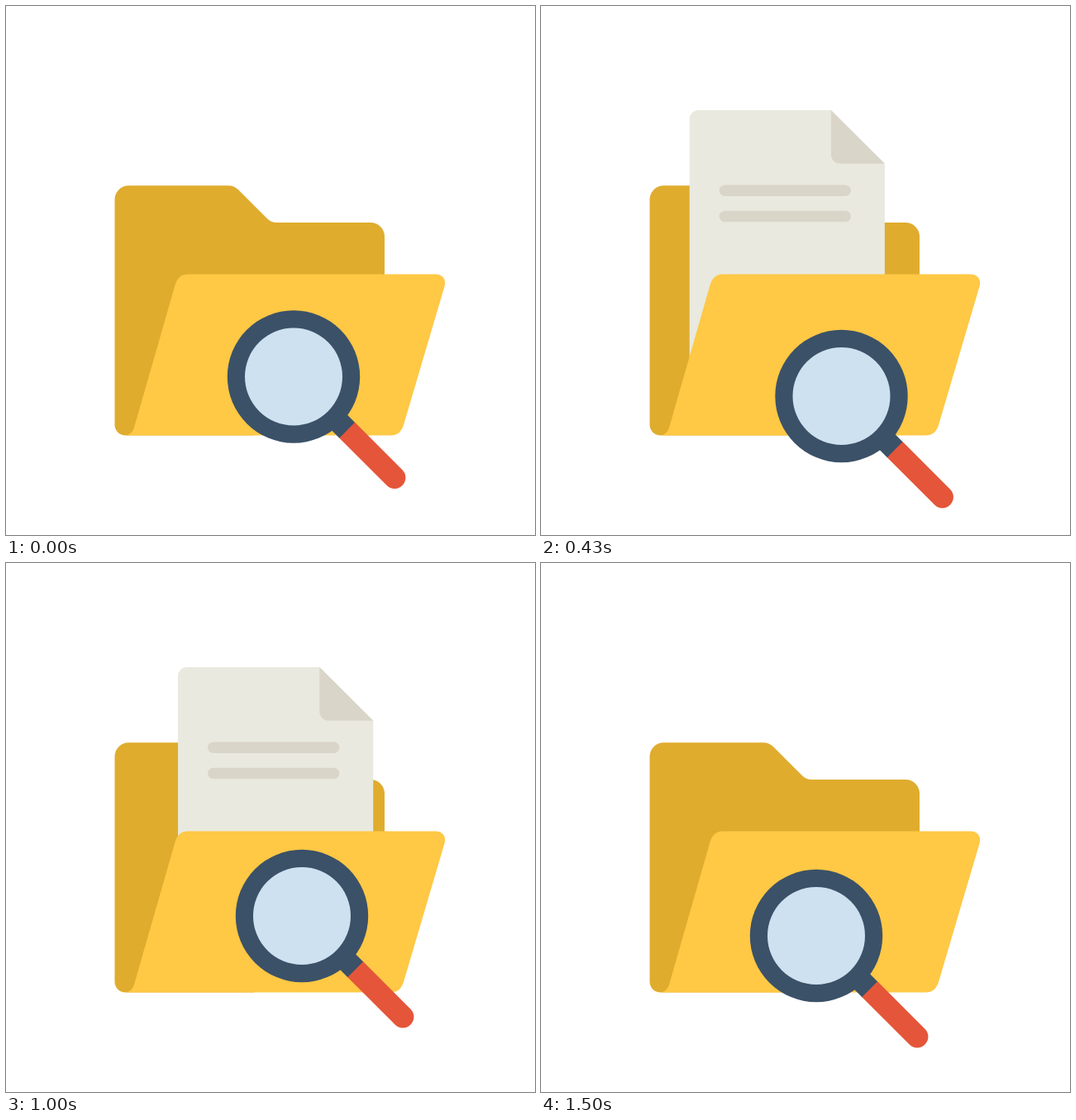
Recreate the animation shown at these times as an HTML page with a canvas. Size 640x640 px, loop 1.64 s.

```html
<!DOCTYPE html>
<html lang="en">
<head>
<meta charset="utf-8">
<title>Folder search</title>
<style>
  html, body { margin: 0; width: 100%; height: 100%; overflow: hidden; background: #fff; }
  canvas { display: block; width: 640px; height: 640px; }
</style>
</head>
<body>
<canvas id="stage" width="640" height="640"></canvas>
<script>
const ctx = document.getElementById('stage').getContext('2d');
const LOOP = 1640, FPS = 14, LAST_STEP = 21;
const BACK = '#dfac2e', FRONT = '#ffc845', PAPER = '#e9e9df', SHADE = '#dad5c9';
const RIM = '#3b5168', LENS = '#cee1f0', HANDLE = '#e55539';

const folderBack = new Path2D(
  'M148.5 217.2H268.5Q276 217.2 281.3 222.4L315.5 256.8Q320.3 262 328 262H441' +
  'A17 17 0 0 1 458 279V400L300 519.5H144.5A13 13 0 0 1 131.5 506.5V234.2A17 17 0 0 1 148.5 217.2Z');
const folderFront = new Path2D(
  'M220 324.5H520C528 324.5 533 331 530.6 339L481 507Q477 519.5 465.5 519.5H143.5' +
  'Q152 519.5 155 510L204.7 337Q208.5 324.5 220 324.5Z');
const sheet = new Path2D(
  'M11 126H171.2L236.2 190.8V433.2A11 11 0 0 1 225.2 444.2H11A11 11 0 0 1 0 433.2V137A11 11 0 0 1 11 126Z');
const fold = new Path2D('M171.2 126L236.2 190.8H182.2A11 11 0 0 1 171.2 179.8Z');

// Centre of the magnifier, one waypoint for every two steps
const waypoints = [
  [348, 448.5], [339, 463], [347, 475.5], [363.5, 472], [377.7, 461.7],
  [376.5, 446], [368, 432.8], [358, 427], [346.6, 425.3]
];
const PULL_START = 16, pull = [-13.6, 25.7];

function fill(path, color) {
  ctx.fillStyle = color;
  ctx.fill(path);
}

function roundBox(x, y, w, h, radii, color) {
  const path = new Path2D();
  path.roundRect(x, y, w, h, radii);
  fill(path, color);
}

function disc(x, y, r, color) {
  const path = new Path2D();
  path.arc(x, y, r, 0, Math.PI * 2);
  fill(path, color);
}

function spline(points, pos) {
  const i = Math.min(Math.floor(pos), points.length - 2);
  const u = pos - i;
  const at = k => points[Math.max(0, Math.min(points.length - 1, k))];
  return [0, 1].map(axis => {
    const [a, b, c, d] = [at(i - 1), at(i), at(i + 1), at(i + 2)].map(p => p[axis]);
    return b + u / 2 * (c - a + u * (2 * a - 5 * b + 4 * c - d + u * (3 * (b - c) + d - a)));
  });
}

function along(point, amount) {
  return point.map((v, axis) => v + pull[axis] * amount);
}

function paperX(step) {
  const entering = Math.max(0, 8 - step), leaving = Math.max(0, step - 12);
  return 190.8 - 1.39 * entering ** 3 + 2.16 * leaving ** 3;
}

function magnifierPose(step) {
  if (step < PULL_START) {
    const rim = spline(waypoints, step / 2);
    return { rim, lens: rim };
  }
  const u = (step - PULL_START) / (LAST_STEP - PULL_START);
  const rim = along(waypoints[waypoints.length - 1], 1 - (1 - u) ** 2.57);
  const lag = 0.107 * Math.sin(Math.PI * (step - 15.5) / 5.5);
  return { rim, lens: along(rim, -lag) };
}

function drawPaper(x) {
  ctx.save();
  ctx.translate(x, 0);
  fill(sheet, PAPER);
  fill(fold, SHADE);
  for (const y of [216.5, 247.8]) roundBox(36, y, 159.2, 13.4, 6.7, SHADE);
  ctx.restore();
}

function drawMagnifier({ rim, lens }) {
  ctx.save();
  ctx.translate(...rim);
  ctx.rotate(Math.PI / 4);
  roundBox(70, -13.3, 22, 26.6, 0, RIM);
  roundBox(91.6, -13.3, 94.4, 26.6, [0, 13.3, 13.3, 0], HANDLE);
  ctx.restore();
  disc(...rim, 80.2, RIM);
  disc(...lens, 59, LENS);
}

function draw(now) {
  // Steps fall on hundredths of a second
  const ticks = Math.floor((now % LOOP) / 10);
  const step = Math.min(LAST_STEP, Math.floor((ticks + 0.5) * FPS / 100));
  ctx.fillStyle = '#fff';
  ctx.fillRect(0, 0, 640, 640);
  fill(folderBack, BACK);
  drawPaper(paperX(step));
  fill(folderFront, FRONT);
  drawMagnifier(magnifierPose(step));
  requestAnimationFrame(draw);
}

draw(0);
</script>
</body>
</html>
```
